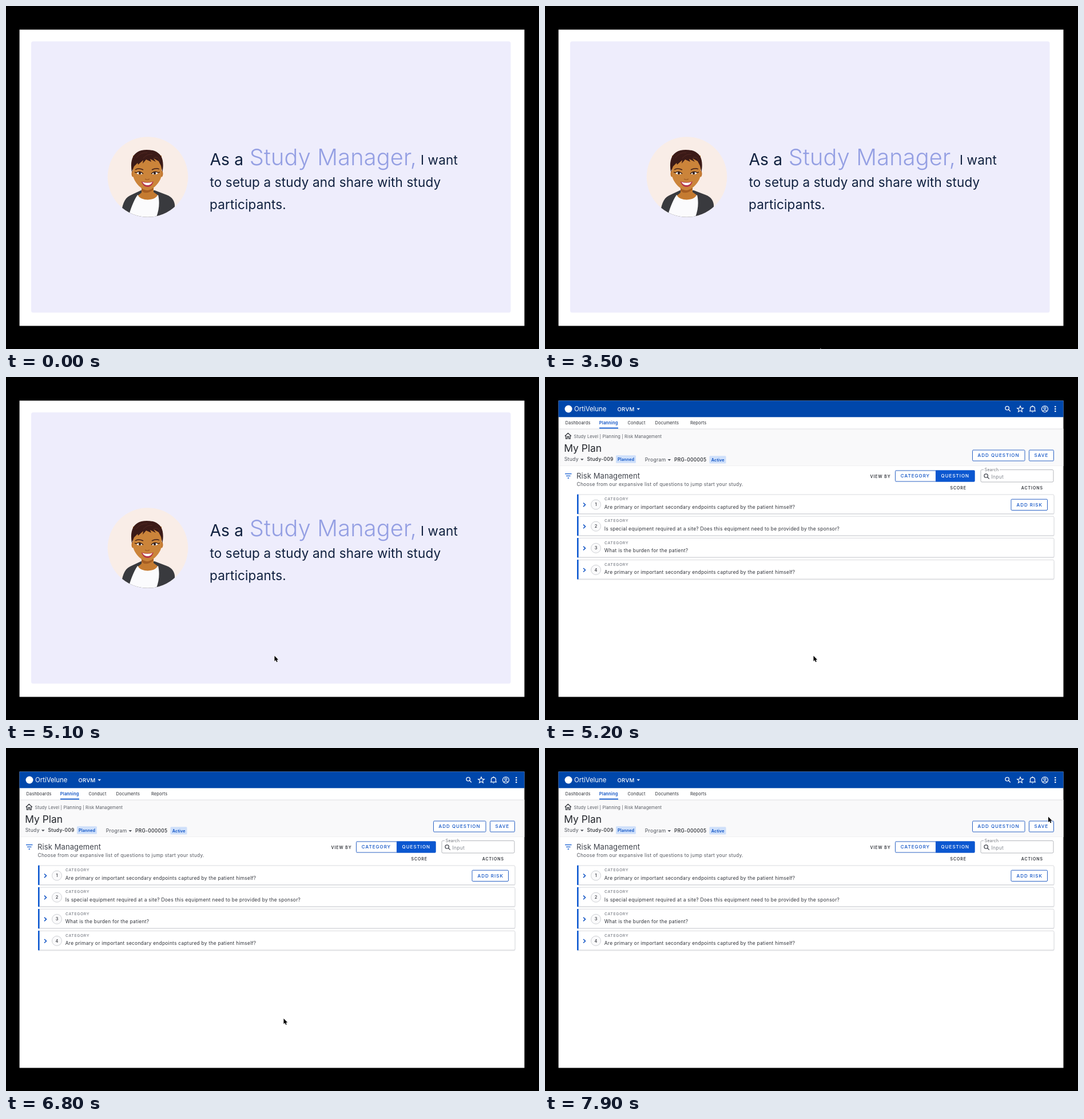
An HTML page that plays this animation: 932 px wide and 601 px high, repeating every 8000 ms.

```html
<!DOCTYPE html>
<html lang="en">
<head>
<meta charset="utf-8">
<title>Study planning demo</title>
<style>
html, body { margin: 0; height: 100%; overflow: hidden; background: #000; }
svg { display: block; width: 932px; height: 601px; }
text { font-family: Inter, sans-serif; font-optical-sizing: none; white-space: pre; }
#slide text { fill: #10213f; font-size: 22.6px; letter-spacing: .1px; }
#slide .lead { font-size: 28.3px; }
#slide .role { font-size: 39.8px; font-weight: 350; fill: #949fe3; }
.tab { font-size: 7.4px; letter-spacing: .2px; fill: #2c2f36; }
.crumb { font-size: 7.4px; letter-spacing: .18px; fill: #565a62; }
.meta { font-size: 8.6px; letter-spacing: .3px; fill: #4b4f57; }
.code { font-size: 8.4px; letter-spacing: .35px; font-weight: 500; fill: #22252b; }
.badge { font-size: 7.2px; letter-spacing: .15px; font-weight: 600; fill: #0b50c4; }
.body { font-size: 8.4px; letter-spacing: .27px; fill: #30333a; }
.label { font-size: 6.8px; letter-spacing: .65px; font-weight: 500; fill: #7b7f87; }
.head { font-size: 7px; letter-spacing: .9px; font-weight: 600; fill: #34373d; }
.btn { font-size: 8px; letter-spacing: 1px; font-weight: 500; fill: #0b50c4; }
.line { fill: none; stroke-width: 1.3; }
.box { fill: #fff; stroke: #2a62c4; }
.blue { fill: #0b57d0; }
</style>
</head>
<body>
<svg viewBox="0 0 932 601">
<defs>
  <clipPath id="disc"><circle cx="248" cy="299.5" r="70.3"/></clipPath>
  <path id="down" d="M0 0H5.6L2.8 3Z"/>
  <g id="lens"><circle r="3.2"/><path d="M2.3 2.3L5.6 5.6"/></g>
</defs>
<rect width="932" height="601"/>
<rect x="23.6" y="41.4" width="882.9" height="519.1" fill="#fff"/>

<g id="slide">
  <rect x="44" y="62" width="838.5" height="475.3" rx="3.5" fill="#eeedfc"/>
  <g clip-path="url(#disc)">
    <rect x="177" y="229" width="142" height="142" fill="#f9ede7"/>
    <path d="M200 372C203 350 206 337 217 332L236 323H260L281 331C292 335 296 344 295 353L290 372Z" fill="#393a3e"/>
    <path d="M213 372C218 356 222 343 230 331Q248 343 266 331C269 343 268 358 262 372Z" fill="#fbfbfd"/>
    <path d="M237 310H258V326L265 331C261 342 236 342 231 332L237 327Z" fill="#c57b31"/>
    <path d="M237 316Q247 329 258 316V321Q246 332 237 324Z" fill="#a65e23"/>
    <ellipse cx="222" cy="294" rx="2.5" ry="5.5" fill="#c0742d"/>
    <ellipse cx="272" cy="294" rx="2.5" ry="5.5" fill="#c0742d"/>
    <path d="M222 262H272V296C271 308 257 323 247 323S223 308 222 296Z" fill="#cb843a"/>
    <path d="M220 291C216 268 223 252 246 252C270 252 278 266 273.5 291L271 280 267 272 258 267 262 273 252 268 254 273 245 269 239 276 240 270 231 278 230 275 224 281Z" fill="#3b1a17"/>
    <path d="M228 266Q235 256 247 257M240 267Q246 259 256 260M258 266Q266 262 269 272" fill="none" stroke="#572b25" stroke-width=".8"/>
    <path d="M226 287Q231 283 240 287M255 287Q263 283 268 286" fill="none" stroke="#42201a" stroke-width="1.4"/>
    <g id="eye">
      <path d="M228 293Q233 288 239 294Q233 297 228 293Z" fill="#fff"/>
      <circle cx="234" cy="293" r="2.2" fill="#3a2520"/>
      <path d="M225 291L228 292Q234 288 240 294" fill="none" stroke="#24110f" stroke-width="1.3"/>
    </g>
    <use href="#eye" transform="matrix(-1 0 0 1 494 0)"/>
    <path d="M243 303Q247 305.5 251 303" fill="none" stroke="#9e5924" stroke-width="1.2"/>
    <path d="M236.5 307.5Q247 310 258 307.5Q255 317 247.5 317T236.5 307.5Z" fill="#b63349"/>
    <path d="M238.5 308.5Q247 311 256 308.5Q253 314 247.5 314T238.5 308.5Z" fill="#fff"/>
  </g>
  <text class="lead" x="356.5" y="278.5">As a</text>
  <text class="role" x="425.8" y="279">Study Manager,</text>
  <text x="725" y="278.3">I want</text>
  <text x="356.5" y="317.3">to setup a study and share with study</text>
  <text x="356" y="355.8">participants.</text>
</g>

<g id="app">
  <rect x="23.6" y="41.4" width="882.9" height="28.9" fill="#0047ab"/>
  <circle cx="41" cy="56" r="6.5" fill="#fff"/>
  <g fill="#fff">
    <text x="51" y="60" font-size="11.4">OrtiVelune</text>
    <text x="126.5" y="59.7" font-size="9.6" font-weight="500" letter-spacing=".25">ORVM</text>
    <use href="#down" x="160.5" y="54.8"/>
    <circle cx="892.3" cy="52" r="1.3"/><circle cx="892.3" cy="56" r="1.3"/><circle cx="892.3" cy="60" r="1.3"/>
    <path d="M847 59H858V60.2H847ZM851.2 61H853.8Q852.5 63.2 851.2 61ZM851.7 50H853.3V52H851.7Z"/>
  </g>
  <g class="line" stroke="#fff">
    <use href="#lens" x="808.2" y="54.6"/>
    <path stroke-width="1.1" d="M831 50.8L832.5 54.4 836.4 54.7 833.4 57.2 834.4 61 831 58.9 827.6 61 828.6 57.2 825.6 54.7 829.5 54.4Z"/>
    <path stroke-width="1.2" d="M848.5 59.5V55C848.5 50.5 856.5 50.5 856.5 55V59.5"/>
    <circle cx="874" cy="56" r="5.5" stroke-width="1.2"/>
    <circle cx="874" cy="54.2" r="1.9" stroke-width="1.1"/>
    <path d="M870 59.8Q874 56.3 878 59.8" stroke-width="1.1"/>
  </g>

  <text class="tab" x="35.5" y="83.3">Dashboards</text>
  <text class="tab" x="94.8" y="83.3" style="font-weight:600;fill:#0b50c4">Planning</text>
  <text class="tab" x="144.5" y="83.3">Conduct</text>
  <text class="tab" x="192.5" y="83.3">Documents</text>
  <text class="tab" x="254" y="83.3">Reports</text>
  <rect x="24" y="91" width="882.5" height="64.5" fill="#f9f9fa"/>
  <path d="M24 91H906.5" stroke="#dedfe2"/>
  <path d="M24 155.5H906.5" stroke="#f0f0f2"/>
  <rect class="blue" x="95" y="88.6" width="33" height="1.8"/>

  <path class="line" d="M34.8 103.5L40.3 98.3 45.8 103.5M36.5 102.5V108.2H39V104.5H41.6V108.2H44.1V102.5" stroke="#34373d"/>
  <text class="crumb" x="50.5" y="107">Study Level | Planning | Risk Management</text>
  <text x="33.3" y="131.3" font-size="17.4" fill="#24272d">My Plan</text>
  <text class="meta" x="33.8" y="147.2">Study</text>
  <use href="#down" x="62" y="143.3" fill="#4b4f57"/>
  <text class="code" x="73.5" y="147.2">Study-009</text>
  <rect x="124" y="137.3" width="35" height="13.5" rx="1.5" fill="#cfe0fa"/>
  <text class="badge" x="127" y="146.7">Planned</text>
  <text class="meta" x="174.8" y="148">Program</text>
  <use href="#down" x="214.5" y="144" fill="#4b4f57"/>
  <text class="code" x="226" y="148">PRG-000005</text>
  <rect x="287.5" y="138.3" width="29" height="13.3" rx="1.5" fill="#cfe0fa"/>
  <text class="badge" x="290.8" y="147.6">Active</text>
  <rect class="box" x="747.5" y="128" width="91.5" height="19" rx="1.5"/>
  <text class="btn" x="756.6" y="140.4">ADD QUESTION</text>
  <rect class="box" x="846.5" y="128" width="43" height="19" rx="1.5"/>
  <text class="btn" x="855.6" y="140.4">SAVE</text>

  <path class="line" d="M35 169.7H46.5M37 173.3H44.5M39.5 177H42" stroke="#0b57d0"/>
  <text x="55" y="178" font-size="13" letter-spacing=".1" fill="#41454d">Risk Management</text>
  <text class="body" x="55.5" y="190.6" style="fill:#50545c">Choose from our expansive list of questions to jump start your study.</text>
  <text class="head" x="568.5" y="177.3">VIEW BY</text>
  <rect class="box" x="612.5" y="164" width="138.5" height="19" rx="1.5"/>
  <rect class="blue" x="683" y="163.5" width="68.5" height="20" rx="1"/>
  <text class="btn" x="621.8" y="176.4">CATEGORY</text>
  <text class="btn" x="692.5" y="176.4" style="fill:#fff">QUESTION</text>
  <rect x="762" y="162.5" width="127" height="21.5" rx="2" fill="#fff" stroke="#b4b7bc"/>
  <rect x="767" y="160" width="28" height="6" fill="#fff"/>
  <text x="768.8" y="164.8" font-size="7" letter-spacing=".2" fill="#6b6f77">Search</text>
  <use href="#lens" class="line" x="771.2" y="173" stroke="#41454d"/>
  <text x="780.5" y="177.5" font-size="8.6" letter-spacing=".2" fill="#858991">Input</text>
  <text class="head" x="708.5" y="196.7">SCORE</text>
  <text class="head" x="832.8" y="196.7">ACTIONS</text>

  <g id="cards"></g>
  <rect class="box" x="815" y="214.2" width="63.5" height="19.3" rx="1.5"/>
  <text class="btn" x="824.5" y="226.9">ADD RISK</text>
</g>

<path id="cursor" d="M0 0V9.6L2.2 7.6 3.7 11 5.3 10.3 3.9 7.1H6.7Z" stroke="#fff" stroke-width=".9" paint-order="stroke"/>
</svg>
<script>
const $ = id => document.getElementById(id);
const LOOP = 8000, STEP = 100, CUT = 5200;

const endpoints = 'Are primary or important secondary endpoints captured by the patient himself?';
const questions = [
  endpoints,
  'Is special equipment required at a site? Does this equipment need to be provided by the sponsor?',
  'What is the burden for the patient?',
  endpoints
];
$('cards').innerHTML = questions.map((question, i) => `
  <g transform="translate(0 ${(206 + 38.15 * i).toFixed(2)})">
    <rect x="56.5" y="1" width="834" height="34" rx="2" fill="#e4e5e8"/>
    <rect x="56.5" y="0" width="833.5" height="33.5" rx="2" fill="#fff" stroke="#d9dade"/>
    <rect class="blue" x="56" y="-.3" width="2.6" height="34.3"/>
    <path class="line" d="M67 14.5L70.5 17.8 67 21.1" stroke="#0b50c4" style="stroke-width:1.5"/>
    <circle cx="89" cy="17.5" r="8.5" fill="#fafafb" stroke="#cfd1d5"/>
    <text x="89" y="20.2" font-size="7.4" font-weight="500" text-anchor="middle" fill="#30333a">${i + 1}</text>
    <text class="label" x="104" y="10.3">CATEGORY</text>
    <text class="body" x="103.8" y="24.5">${question}</text>
  </g>`).join('');

// Cursor stops: time, x, y
const stops = [
  [3500, 481.5, 600], [3700, 483.5, 584], [4300, 483.5, 584], [4900, 469.5, 488.5],
  [6700, 469.5, 488.5], [6800, 485.5, 474], [7000, 672.5, 395.5],
  [7200, 672.5, 395.5], [7900, 880, 120.5]
];

function cursorAt(t) {
  const next = stops.findIndex(stop => stop[0] > t);
  if (next < 0) return stops[stops.length - 1].slice(1);
  const [t0, x0, y0] = stops[next - 1], [t1, x1, y1] = stops[next];
  const p = (t - t0) / (t1 - t0), e = p * p * (3 - 2 * p);
  return [x0 + (x1 - x0) * e, y0 + (y1 - y0) * e];
}

function show(id, visible) {
  $(id).style.display = visible ? '' : 'none';
}

function draw() {
  const t = Math.floor(performance.now() % LOOP / STEP) * STEP;
  const moving = t >= stops[0][0];
  show('slide', t < CUT);
  show('app', t >= CUT);
  show('cursor', moving);
  if (moving) $('cursor').setAttribute('transform', `translate(${cursorAt(t)})`);
  requestAnimationFrame(draw);
}
draw();
</script>
</body>
</html>
```
